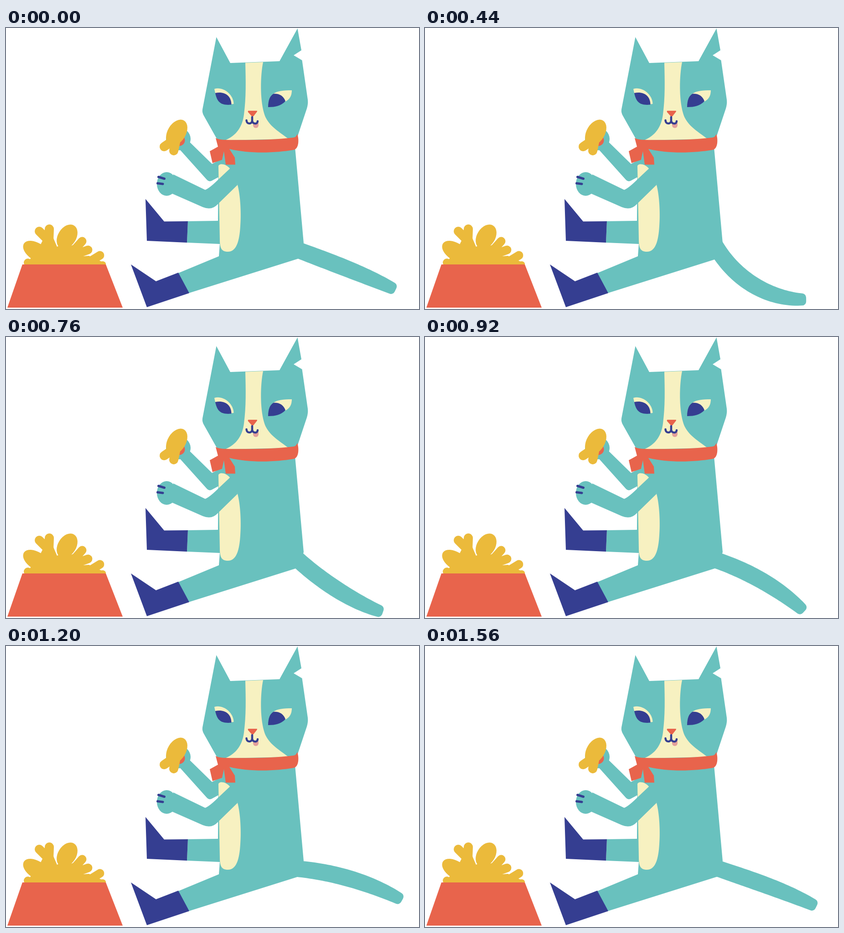
Recreate the animation shown at these times as an HTML page with a canvas. Size 906 px wide and 618 px high, loop 1600 ms.

```html
<!DOCTYPE html>
<html lang="en">
<head>
<meta charset="utf-8">
<title>Cat with snacks</title>
<style>
html, body { margin: 0; width: 100%; height: 100%; overflow: hidden; background: #fff; }
canvas { display: block; }
</style>
</head>
<body>
<canvas id="stage" width="906" height="618"></canvas>
<script>
const ctx = document.getElementById('stage').getContext('2d');
const TEAL = '#69c1be', CREAM = '#f7f1c1', NAVY = '#353e91';
const CORAL = '#e8644c', YELLOW = '#ebba3b', PINK = '#e3a09b';
const LOOP = 1600, STEP = 40;

function shape(color, d) {
  ctx.fillStyle = color;
  ctx.fill(new Path2D(d));
}

function line(color, width, d) {
  ctx.strokeStyle = color;
  ctx.lineWidth = width;
  ctx.lineCap = ctx.lineJoin = 'round';
  ctx.stroke(new Path2D(d));
}

function oval(color, x, y, rx, ry, degrees = 0) {
  ctx.fillStyle = color;
  ctx.beginPath();
  ctx.ellipse(x, y, rx, ry, degrees * Math.PI / 180, 0, 2 * Math.PI);
  ctx.fill();
}

// Tail spine: time, then x,y at 0, 1/3, 2/3 and the full length.
const poses = [
  [0, 647, 490.5, 714, 516, 785, 544.5, 854.5, 576],
  [280, 647, 491, 705, 539, 772, 573, 845, 592.5],
  [600, 643, 492, 691, 550, 755, 588.5, 829, 600],
  [920, 645, 493, 712, 521.5, 775, 558.5, 832, 603.5],
  [1200, 645, 490.5, 722.5, 503.5, 798, 526.5, 869, 559],
  [1280, 645, 489.5, 725, 502.5, 804, 521, 883.5, 544.5],
  [1360, 645, 490.5, 724.5, 504, 802, 524, 877.5, 552],
  [1560, 646, 490.5, 717, 515, 789, 542, 858.5, 573]
];

function poseAt(i) {
  const n = poses.length, turn = Math.floor(i / n);
  const [time, ...points] = poses[i - turn * n];
  return { time: time + turn * LOOP, points };
}

// Smooth periodic interpolation with unevenly spaced keys.
function spineAt(t) {
  let i = poses.length - 1;
  while (poses[i][0] > t) i--;
  const [a, b, c, d] = [i - 1, i, i + 1, i + 2].map(poseAt);
  const h0 = b.time - a.time, h = c.time - b.time, h1 = d.time - c.time;
  const u = (t - b.time) / h, v = 1 - u;
  return b.points.map((p, k) => {
    const q = c.points[k], s = (q - p) / h;
    const m0 = ((p - a.points[k]) / h0 * h + s * h0) / (h0 + h);
    const m1 = (s * h1 + (d.points[k] - q) / h1 * h) / (h + h1);
    return p * (1 + 2 * u) * v * v + q * u * u * (3 - 2 * u)
      + h * (m0 * u * v * v - m1 * u * u * v);
  });
}

// Cubic through four evenly spaced values, with its slope.
function cubic(a, b, c, d, u) {
  const k1 = (-11 * a + 18 * b - 9 * c + 2 * d) / 2;
  const k2 = (18 * a - 45 * b + 36 * c - 9 * d) / 2;
  const k3 = (-9 * a + 27 * b - 27 * c + 9 * d) / 2;
  return [a + u * (k1 + u * (k2 + u * k3)), k1 + u * (2 * k2 + 3 * u * k3)];
}

function drawTail(t) {
  const [x0, y0, x1, y1, x2, y2, x3, y3] = spineAt(t);
  const edge = (u, side) => {
    const [x, dx] = cubic(x0, x1, x2, x3, u);
    const [y, dy] = cubic(y0, y1, y2, y3, u);
    const w = side * (18 + 2.5 * u - 8 * u ** 3) / Math.hypot(dx, dy);
    return [x + dy * w, y - dx * w];
  };
  // The root starts slightly before the spine, hidden inside the body.
  const n = 40, first = -3, last = n - 2;
  const top = edge(1, 1), bottom = edge(1, -1);
  ctx.fillStyle = TEAL;
  ctx.beginPath();
  for (let i = first; i < last; i++) ctx.lineTo(...edge(i / n, 1));
  ctx.arcTo(...top, ...bottom, 9);
  ctx.arcTo(...bottom, ...edge(last / n, -1), 9);
  for (let i = last - 1; i >= first; i--) ctx.lineTo(...edge(i / n, -1));
  ctx.fill();
}

function drawBowl() {
  oval(YELLOW, 134, 459, 29, 20, -58);
  oval(YELLOW, 67, 492, 33, 19, 33);
  shape(YELLOW, 'M42 521 L70 488 L84 460 L103 460 L112 481 L118 478 L138 480 L152 476 L163 484 L169 502 L182 501 L219 518 V521Z');
  line(YELLOW, 20, 'M73 447 L90 464 M95 442 L94 470');
  line(YELLOW, 19, 'M167 469 L150 488 M180 488 L158 496 M206 500 L188 511');
  oval(YELLOW, 48, 516, 9, 9);
  oval(YELLOW, 212, 519, 7, 6);
  shape(CORAL, 'M36 520 H219 L256 615 H3Z');
}

function drawBackArm() {
  oval(TEAL, 378, 244, 27, 25);
  shape(TEAL, 'M402 250 L452 299 L480 284 L468 327 L453 335 Q446 340 440 333 L380 266Z');
  oval(CORAL, 380, 247, 12.5, 12.5);
  line(YELLOW, 20, 'M366 248 L347 261 M373 246 L368 270');
  oval(YELLOW, 374.5, 230, 31, 20, -59);
}

function drawBody() {
  shape(TEAL, 'M466 262 H634 L653 473 L642 507 L401 583 L378 539 L467 502 L469 475 L397 472 L399 425 L465 424Z');
  shape(NAVY, 'M306 376 L347 425.500 L399 425 L397 472 L309 468Z');
  shape(NAVY, 'M274 520 L329 557 L378 538 L402 583 L309 614Z');
  shape(CREAM, 'M466 304 C467 297 482 298 491 309 L508 345 C515 372 516 412 514 436 C512 470 505 492 487 492 C474 492 469 486 469 465Z');
}

function drawFrontArm() {
  shape(TEAL, 'M494 306.500 L467 332 Q447 352 437 356 L367 322 L364 364 L432 394 Q452 402 465 387 L508 345Z');
  oval(TEAL, 352.500, 343, 21.500, 26);
  line(NAVY, 5, 'M334.500 327.500 L347.500 331.500 M332.500 341.500 L344 343');
}

function drawHead() {
  shape(TEAL, 'M461.500 20 L492 77 L600 73 L639.500 1 L648 49 L631 60 L649.500 71 L662 158 Q663 167 660 177 L637 246 L466 250 L434 193 Q430 186 431 179Z');
  shape(CREAM, 'M525 76.500 L564 75 C558 105 557 155 566 187 C573 213 596 226 620 244 L480 247 C506 237 519 216 522 190 C527 152 526 116 525 76.500Z');

  shape(CREAM, 'M457 134 C475 128 499 145 499.500 167 L490 168 L459 143Z');
  shape(NAVY, 'M459 143 C479 139 494 148 494.500 168.500 C469 171 463 161 459 143Z');
  shape(CREAM, 'M586 145 C595 138 609 137 627 137 C627 149 622 158 612 162Z');
  shape(NAVY, 'M575 174 C575 159 579 149 587 144.500 C601 144 609 150 613 161 C603 171 592 174 575 174Z');

  shape(PINK, 'M542 209 H554 V214 A6 6 0 0 1 542 214Z');
  shape(CORAL, 'M532 182 H550 Q552 182 550 185 L543 194 Q541 196 539 194 L531 185 Q530 182 532 182Z');
  line(NAVY, 4.5, 'M540 196 V204 M527.500 203 C528 212 539 212 540 204 C541 212 552 212 552 205');
}

function drawScarf() {
  shape(CORAL, 'M460 242 Q468 246 482 246 C530 247 590 246 630 241 Q637 240 639 233 C643 244 643 266 631 268 C590 275 535 277 490 266 L502 285 L503 300.500 H482 L478 271 L474 290 L453 297 L447 271 L465 261Z');
}

function draw(t) {
  ctx.fillStyle = '#fff';
  ctx.fillRect(0, 0, 906, 618);
  drawBowl();
  drawTail(t);
  drawBackArm();
  drawBody();
  drawFrontArm();
  drawHead();
  drawScarf();
}

const start = performance.now();
function tick() {
  const t = (performance.now() - start) % LOOP;
  draw(Math.floor(t / STEP) * STEP);
  requestAnimationFrame(tick);
}
tick();
</script>
</body>
</html>
```
